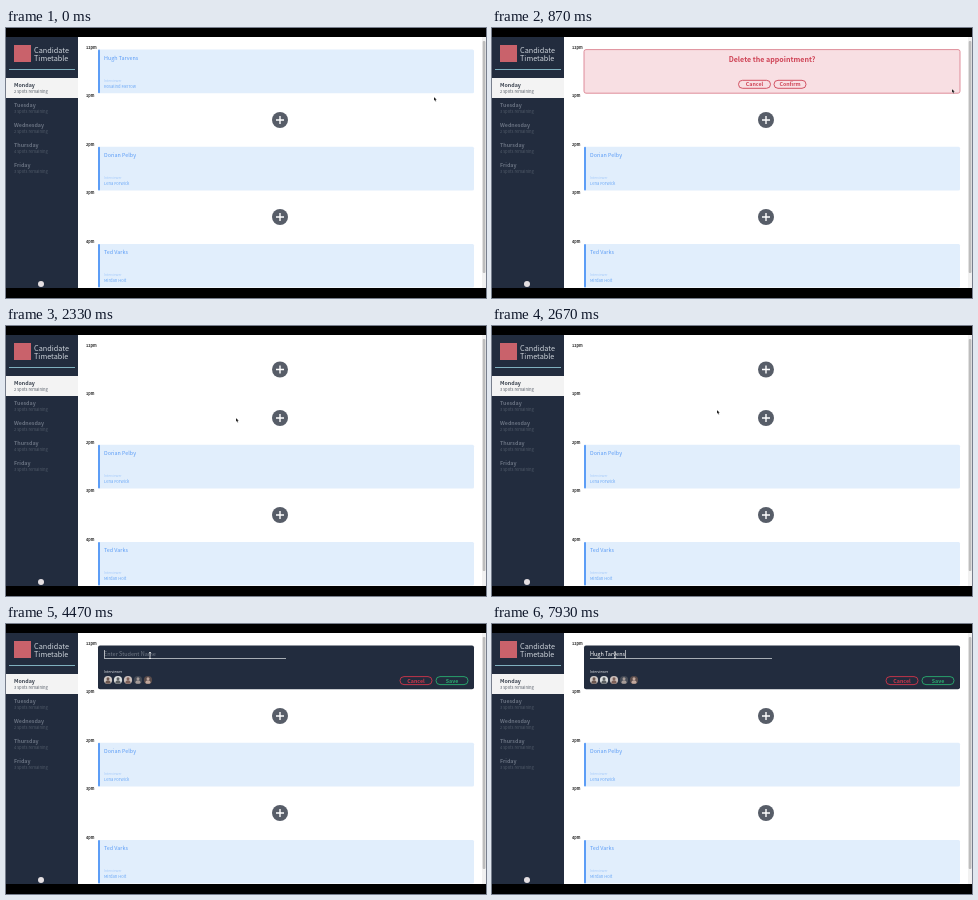
An HTML page that plays this animation: 480x270 px, repeating every 8000 ms.

```html
<!DOCTYPE html>
<html lang="en">
<head>
<meta charset="utf-8">
<title>Appointments</title>
<style>
  html, body { margin: 0; width: 100%; height: 100%; overflow: hidden; background: #000; }
  svg { display: block; width: 480px; height: 270px; font-family: "Noto Sans CJK JP", "Noto Sans CJK SC", "Noto Sans", sans-serif; }
  text { white-space: pre; }
</style>
</head>
<body>
<svg id="stage" viewBox="0 0 480 270"></svg>
<script>
const DARK = '#222c3e', BLUE = '#5c9df6', RED = '#cf4456';
const stage = document.getElementById('stage');

const text = (x, y, size, fill, str, more = '') =>
  `<text x="${x}" y="${y}" font-size="${size}" fill="${fill}" ${more}>${str}</text>`;
const rect = (x, y, w, h, fill, more = '') =>
  `<rect x="${x}" y="${y}" width="${w}" height="${h}" fill="${fill}" ${more}/>`;
const group = (id, body) => `<g id="${id}">${body}</g>`;
const BOLD = 'font-weight="700"', MID = 'text-anchor="middle"';

function card(y, student, interviewer) {
  return rect(92, y, 376, 43.6, '#e1eefc', 'rx="1.5"') +
    rect(92, y, 2, 43.6, BLUE, 'rx="1"') +
    text(98, y + 10.4, 5.4, BLUE, student) +
    text(98, y + 32.4, 3.3, '#a3c9fa', 'Interviewer') +
    text(98, y + 38, 4.1, '#6ba8f7', interviewer);
}

function plus(y) {
  return `<circle cx="274" cy="${y}" r="8" fill="#575d68"/>
    <path d="M270 ${y}h8M274 ${y - 4}v8" stroke="#fff" stroke-width="1.4"/>`;
}

function button(x, y, color, label) {
  return rect(x, y, 32, 8, 'none', `rx="4" stroke="${color}" stroke-width=".9"`) +
    text(x + 16, y + 6, 5.3, color, label, `${BOLD} ${MID}`);
}

const panel = (fill, more = '') => rect(92, 21.6, 376, 43.6, fill, `rx="2" ${more}`);

function avatar(x, back, body) {
  return `<circle cx="${x}" cy="56" r="4.1" fill="${back}"/>
    <circle cx="${x}" cy="54.8" r="1.5" fill="${body}"/>
    <path d="M${x - 2.6} 59q0-2.7 2.6-2.7t2.6 2.7q-2.6 1.7-5.2 0" fill="${body}"/>`;
}

const days = [['Monday', 2], ['Tuesday', 3], ['Wednesday', 2], ['Thursday', 4], ['Friday', 3]];
const dayList = days.map(([day, n], i) => {
  const y = 59 + 20 * i;
  return text(8, y, 5.3, i ? '#687180' : '#38404d', day, BOLD) +
    text(8, y + 6, 4.1, i ? '#515b6a' : '#59606b', `${n} spots remaining`, i ? '' : 'id="spots"');
}).join('');

const hours = ['12pm', '1pm', '2pm', '3pm', '4pm']
  .map((h, i) => text(80, 20.8 + 48.5 * i, 3.8, '#222', h, BOLD)).join('');

const avatars = [['#cfc8c4', '#6b5750'], ['#d9dcdc', '#5b5f62'], ['#c9bdb9', '#7c5f58'],
  ['#454b56', '#a59b98'], ['#5a4c4b', '#c2a89d']]
  .map(([back, body], i) => avatar(102 + 10 * i, back, body)).join('');

stage.innerHTML =
  rect(0, 0, 480, 270, '#000') + rect(72, 9, 408, 251, '#fff') +
  rect(0, 9, 72, 251, DARK) +
  rect(8, 17, 17, 17, '#c9626b') +
  text(28, 25.2, 7.3, '#cdd3da', 'Candidate', 'font-weight="300"') +
  text(28, 32.8, 7.3, '#cdd3da', 'Timetable', 'font-weight="300"') +
  rect(3, 41, 66, 1, '#7fb0be') +
  rect(0, 50, 72, 20, '#f3f3f3') + dayList +
  '<circle cx="35" cy="256" r="3" fill="#e4dfe2"/>' +
  rect(476, 9, 4, 251, '#f1f1f1') + rect(476.7, 13, 2.7, 232, '#bdbdbd', 'id="thumb" rx="1"') +
  hours + plus(92) + plus(189) +
  card(118.8, 'Dorian Pelby', 'Lena Forwick') + card(215.9, 'Ted Varks', 'Mirdan Holt') +
  group('show', card(21.6, 'Hugh Tarvens', 'Rosalind Merrow')) +
  group('confirm', panel('#f8dfe3', 'stroke="#dc8391" stroke-width=".9"') +
    text(280, 34, 7.1, RED, 'Delete the appointment?', `${BOLD} ${MID}`) +
    button(246.5, 52.3, RED, 'Cancel') + button(282, 52.3, RED, 'Confirm')) +
  group('deleting', panel(DARK) + text(284, 46, 6.9, '#fff', 'DELETING', `${BOLD} ${MID}`)) +
  group('empty', plus(43.5)) +
  group('form', panel(DARK) +
    text(98, 32.4, 5.5, '#757d89', '', 'id="field"') +
    rect(98, 34, 182, .8, '#c9cdd3') +
    rect(98, 26, .6, 8, '#fff', 'id="caret"') +
    text(98, 48.6, 3.4, '#dfe2e6', 'Interviewer') + avatars +
    button(394, 52.6, '#d1364b', 'Cancel') + button(430, 52.6, '#2aad70', 'Save')) +
  '<path id="arrow" d="M0 0v3.8l.9-.8.7 1.5.7-.3-.7-1.5h1.2z" fill="#000" stroke="#fff" stroke-width=".25"/>' +
  '<path id="beam" d="M-1-3h2M0-3v6M-1 3h2" fill="none" stroke="#fff" stroke-width=".7"/>';

const el = id => document.getElementById(id);
const show = (id, on) => el(id).setAttribute('visibility', on ? 'visible' : 'hidden');

// Start time of each state of the first slot
const states = [['show', 0], ['confirm', 580], ['deleting', 1200], ['empty', 2270], ['form', 3070]];
// Pointer keys: time, x, y
const path = [[70, 428, 69], [200, 477, 56], [330, 473, 52], [580, 460, 61], [870, 460, 61],
  [1130, 300, 56], [1200, 300, 56], [1330, 306.5, 73], [1530, 306.5, 73], [1900, 282, 92],
  [2330, 230, 92], [2600, 225, 84], [2800, 225, 84], [2930, 272, 44], [3100, 272, 44],
  [3870, 165, 61], [3930, 165, 61], [4130, 144, 31.5], [6800, 144, 31.5], [7050, 143, 54],
  [7400, 136, 31], [7930, 123, 31]];
const FOCUS = 4440;
const typed = 'Hugh Tarvens';
const keys = [5470, 5670, 6000, 6130, 6270, 6470, 6600, 6870, 7070, 7270, 7600, 7800];

function pointer(t) {
  const i = path.findIndex(k => k[0] > t);
  if (i === 0) return path[0].slice(1);
  if (i < 0) return path[path.length - 1].slice(1);
  const [t0, x0, y0] = path[i - 1], [t1, x1, y1] = path[i];
  const u = (t - t0) / (t1 - t0), s = u * u * (3 - 2 * u);
  return [x0 + (x1 - x0) * s, y0 + (y1 - y0) * s];
}

function draw(t) {
  states.forEach(([id, start], i) =>
    show(id, t >= start && (i === states.length - 1 || t < states[i + 1][1])));
  el('spots').textContent = `${t < 2400 ? 2 : 3} spots remaining`;

  const [x, y] = pointer(t);
  const overInput = t > 4000 && y > 25 && y < 35;
  el('thumb').setAttribute('fill', x > 476 ? '#a6a6a6' : '#bdbdbd');
  for (const id of ['arrow', 'beam']) el(id).setAttribute('transform', `translate(${x} ${y})`);
  show('arrow', !overInput);
  show('beam', overInput);

  const count = keys.filter(k => k <= t).length;
  const field = el('field');
  field.textContent = count ? typed.slice(0, count) : 'Enter Student Name';
  field.setAttribute('fill', count ? '#fff' : '#757d89');
  field.setAttribute('font-weight', count ? 500 : 400);
  const since = t - (count ? keys[count - 1] : FOCUS);
  show('caret', since >= 0 && since % 1060 < 545);
  el('caret').setAttribute('x', 98.2 + (count ? field.getComputedTextLength() : 0));
}

const begin = performance.now();
function tick() {
  draw((performance.now() - begin) % 8000);
  requestAnimationFrame(tick);
}
tick();
</script>
</body>
</html>
```
